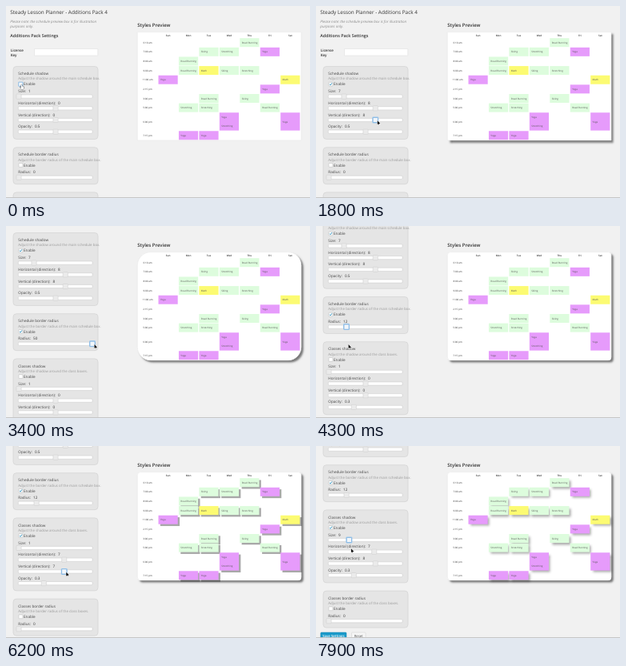
Recreate the animation shown at these times as an HTML page with a canvas. Size 380x240 px, loop 8000 ms.

```html
<!DOCTYPE html>
<html lang="en">
<head>
<meta charset="utf-8">
<title>Styles Preview</title>
<style>
html, body { margin: 0; width: 100%; height: 100%; overflow: hidden; background: #f1f1f1; }
canvas { display: block; width: 380px; height: 240px; }
</style>
</head>
<body>
<canvas id="stage"></canvas>
<script>
const LOOP = 8000, STEP = 100, PX = 1 / 3, TRAVEL = 200;
const canvas = document.getElementById('stage');
const ctx = canvas.getContext('2d');
const ratio = window.devicePixelRatio || 1;
canvas.width = 380 * ratio;
canvas.height = 240 * ratio;
ctx.textRendering = 'geometricPrecision';

// What the user does: control, start, end, final value
const ACTIONS = [
  ['on1', 0, 300, 1], ['size1', 500, 800, 7], ['h1', 1000, 1300, 8], ['v1', 1500, 1700, 8],
  ['on2', 2700, 2800, 1], ['r2', 2900, 3400, 50], ['r2', 3500, 4000, 12],
  ['on3', 4800, 5000, 1], ['h3', 5300, 5600, 7], ['v3', 5800, 6260, 8], ['size3', 6700, 7200, 9]
].map(([key, start, end, value]) => ({ key, start, end, value }));
const SCROLLS = [[2000, 2500, 67], [4140, 4600, 76], [7400, 7800, 10]];

const FIELDS = {
  size: ['Size:', 1, 30],
  h: ['Horizontal (direction):', -30, 30],
  v: ['Vertical (direction):', -30, 30],
  o: ['Opacity:', 0, 1],
  r: ['Radius:', 0, 50]
};
const SHADOW = ['size', 'h', 'v', 'o'], RADIUS = ['r'];
const PANELS = [
  ['Schedule shadow', 'Adjust the shadow around the main schedule box.', SHADOW],
  ['Schedule border radius', 'Adjust the border radius of the main schedule box.', RADIUS],
  ['Classes shadow', 'Adjust the shadow around the class boxes.', SHADOW],
  ['Classes border radius', 'Adjust the border radius of the class boxes.', RADIUS]
].map(([title, note, rows], i) => ({ title, note, rows, n: i + 1, height: rows === SHADOW ? 91 : 46 }));
PANELS.reduce((top, p) => { p.top = top; return top + p.height + 10.2; }, 75.5);

const progress = (t, a, b) => Math.min(1, Math.max(0, (t - a) / (b - a)));
const smooth = k => k * k * (3 - 2 * k);
const mix = (a, b, k) => a + (b - a) * k;
const rowY = (p, i) => p.top + 31 + i * 14.7;
const checkY = p => p.top + 22.2;
const scrollAt = t => SCROLLS.reduce((sum, [a, b, d]) => sum + d * smooth(progress(t, a, b)), 0);

function handleX(field, value) {
  const [, min, max] = FIELDS[field];
  return 16 + 92 * (value - min) / (max - min);
}

function valuesAt(t) {
  const v = { size1: 1, h1: 0, v1: 0, o1: 0.5, r2: 0, size3: 1, h3: 0, v3: 0, o3: 0.34, r4: 0 };
  for (const a of ACTIONS) {
    if (t >= a.start) v[a.key] = Math.round(mix(v[a.key] || 0, a.value, progress(t, a.start, a.end)));
  }
  return v;
}

// Where the pointer rests on an action's control at time t
function grip(a, t) {
  const field = a.key.slice(0, -1), p = PANELS[a.key.slice(-1) - 1];
  const check = field === 'on';
  const x = check ? 16.5 : handleX(field, valuesAt(t)[a.key]);
  const y = check ? checkY(p) : rowY(p, p.rows.indexOf(field)) + 6.8;
  return [x + 2.5, y + 0.6 - scrollAt(t)];
}

function stateAt(t) {
  const i = ACTIONS.findLastIndex(a => a.start <= t);
  const now = ACTIONS[i], next = ACTIONS[i + 1];
  let pointer = grip(now, Math.min(t, now.end));
  if (next) {
    const to = grip(next, next.start);
    const k = smooth(progress(t, Math.max(now.end, next.start - TRAVEL), next.start));
    pointer = pointer.map((c, j) => mix(c, to[j], k));
  }
  return { ...valuesAt(t), scroll: scrollAt(t), focus: now.key, pointer };
}

// y is the middle of the capitals
function text(str, x, y, size, color, style = '', align = 'left') {
  ctx.font = `${style} ${size}px "Open Sans", sans-serif`;
  ctx.fillStyle = color;
  ctx.textAlign = align;
  ctx.fillText(str, x, y + size * 0.36);
  return ctx.measureText(str).width;
}

function box(x, y, w, h, r, fill, stroke, line = 0.5) {
  ctx.beginPath();
  ctx.roundRect(x, y, w, h, r);
  ctx.fillStyle = fill;
  ctx.fill();
  if (stroke) {
    ctx.strokeStyle = stroke;
    ctx.lineWidth = line;
    ctx.stroke();
  }
}

const square = (x, y, size, r, fill, stroke, line) =>
  box(x - size / 2, y - size / 2, size, size, r, fill, stroke, line);

function setShadow(s, n) {
  if (!s['h' + n]) return;
  const k = PX * ratio;
  ctx.shadowColor = `rgba(0,0,0,${s['o' + n]})`;
  ctx.shadowBlur = s['size' + n] * k;
  ctx.shadowOffsetX = s['h' + n] * k;
  ctx.shadowOffsetY = s['v' + n] * k;
}

function path(points) {
  ctx.beginPath();
  points.forEach(([x, y]) => ctx.lineTo(x, y));
}

function checkbox(y, on, focused) {
  if (focused) square(18.4, y, 6, 0.6, '#a9cdeb');
  square(18.4, y, 4.8, 0.3, '#fff', focused ? '#5b9dd9' : '#b9b9b9');
  if (on) {
    path([[17, y], [18.1, y + 1.3], [20, y - 1.5]]);
    ctx.strokeStyle = '#1e8cbe';
    ctx.lineWidth = 0.8;
    ctx.stroke();
  }
  text('Enable', 22, y, 4.65, '#444');
}

function slider(field, y, value, focused) {
  const w = text(FIELDS[field][0], 15.3, y, 4.65, '#444');
  text(field === 'o' ? value.toFixed(1) : value, 15.3 + w + 3, y, 4.65, '#333');
  const x = handleX(field, value), mid = y + 6.6;
  box(15.3, mid - 2.1, 92.7, 4.2, 1, '#fff', '#c6c6c6');
  if (focused) square(x, mid, 8, 1, '#a5cdee');
  square(x, mid, 6.2, 0.8, focused ? '#f2f6fa' : '#ebebeb', focused ? '#5b9dd9' : '#d0d0d0', 0.6);
}

function panel(p, s) {
  box(9, p.top, 106, p.height, 4, '#e5e5e5', '#cfcfcf', 0.6);
  text(p.title, 15.3, p.top + 9, 4.65, '#444');
  text(p.note, 15.3, p.top + 15.3, 4.38, '#999');
  checkbox(checkY(p), s['on' + p.n], s.focus === 'on' + p.n);
  p.rows.forEach((field, i) => {
    const key = field + p.n;
    slider(field, rowY(p, i), s[key], s.focus === key);
  });
}

function settings(s) {
  ctx.save();
  ctx.translate(0, -s.scroll);
  text('Steady Lesson Planner - Additions Pack 4', 5.3, 7.7, 6.4, '#333');
  text('Please note: the schedule preview box is for illustration', 5.3, 19.8, 4.5, '#888', 'italic');
  text('purposes only.', 5.3, 25.8, 4.5, '#888', 'italic');
  text('Additions Pack Settings', 5.3, 37, 5.35, '#333', '600');
  text('License', 5.7, 55.6, 4.5, '#333', '600');
  text('Key', 5.7, 61, 4.5, '#333', '600');
  box(35.5, 53.5, 79.3, 8.5, 0.3, '#fff', '#d8d8d8');
  PANELS.forEach(p => panel(p, s));
  box(5.8, 386, 32.2, 9.4, 1, '#1b9ac9', '#0b7fae');
  text('Save Settings', 21.9, 390.2, 4.3, '#fff', '600', 'center');
  box(44.5, 386, 17.5, 9.4, 1, '#f6f6f6', '#ccc');
  text('Reset', 53.2, 390.2, 4.3, '#555', '', 'center');
  ctx.restore();
}

const DAYS = ['Sun', 'Mon', 'Tue', 'Wed', 'Thu', 'Fri', 'Sat'];
const TIMES = ['6:10 am', '7:00 am', '8:00 am', '9:00 am', '11:00 am', '2:15 pm', '3:00 pm', '5:00 pm', '6:00 pm', '7:15 pm'];
const GREEN = '#ddfcdd', PURPLE = '#e69bfb', YELLOW = '#fcfb72';
const CLASSES = {
  R: [GREEN, 'Road Running'], S: [GREEN, 'Stretching'], K: [GREEN, 'Skiing'],
  M: [YELLOW, 'Math'], Y: [PURPLE, 'Yoga'], D: [PURPLE, 'Yoga', 'Stretching']
};
// One letter per day, Sunday first
const WEEK = ['....R..', '..KS.Y.', '.R.....', '.RMKS..', 'Y.....M', '.....Y.', '..R.K..', '.SS..R.', '...D..Y', '.YY....'];
const TALL = 8;

function cell(x, y, h, [color, ...names], s) {
  setShadow(s, 3);
  box(x, y, 24.2, h, 0, color);
  ctx.shadowColor = 'transparent';
  names.forEach((name, i) => text(name, x + 2.4, y + h * (i + 0.5) / names.length, 3, '#555'));
}

function preview(s) {
  const frame = [164.3, 32.6, 204.8, 135.3, s.r2 * PX, '#fff'];
  text('Styles Preview', 164.3, 23.8, 6, '#333', '600');
  setShadow(s, 1);
  box(...frame);
  ctx.shadowColor = 'transparent';
  box(...frame, '#dcdcdc', 0.4);

  const colX = d => 190.5 + d * 25.45;
  DAYS.forEach((d, i) => text(d, colX(i) + 12.1, 36.6, 3.1, '#333', '600', 'center'));
  WEEK.forEach((line, r) => {
    const y = 40.2 + r * 11.63 + (r > TALL ? 11.4 : 0);
    const h = r === TALL ? 22.4 : 11;
    text(TIMES[r], 177, y + h / 2, 3, '#333', '', 'center');
    [...line].forEach((c, d) => {
      if (c !== '.') cell(colX(d), y, h, CLASSES[c], s);
    });
  });
}

const ARROW = [[0, 0], [0, 5], [1.2, 4], [2.2, 5.6], [2.1, 3.7], [3.6, 3.6]];
const HAND = [[0, 0], [1, 0], [1.1, 2], [3.3, 2.5], [2.8, 5.6], [0.2, 5.6], [-1.4, 3], [0, 3.6]];

function pointer(s) {
  const hand = s.focus.startsWith('on');
  ctx.save();
  ctx.translate(...s.pointer);
  path(hand ? HAND : ARROW);
  ctx.closePath();
  ctx.lineJoin = 'round';
  ctx.lineWidth = 0.7;
  ctx.strokeStyle = hand ? '#333' : '#fff';
  ctx.stroke();
  ctx.fillStyle = hand ? '#fff' : '#111';
  ctx.fill();
  ctx.restore();
}

function draw(t) {
  const s = stateAt(t);
  ctx.setTransform(ratio, 0, 0, ratio, 0, 0);
  ctx.fillStyle = '#f1f1f1';
  ctx.fillRect(0, 0, 380, 240);
  settings(s);
  preview(s);
  ctx.fillStyle = '#c6c6c6';
  ctx.fillRect(0, 239, 380, 1);
  pointer(s);
}

const start = performance.now();
function tick() {
  const t = (performance.now() - start) % LOOP;
  draw(Math.floor(t / STEP) * STEP);
  requestAnimationFrame(tick);
}
tick();
</script>
</body>
</html>
```
